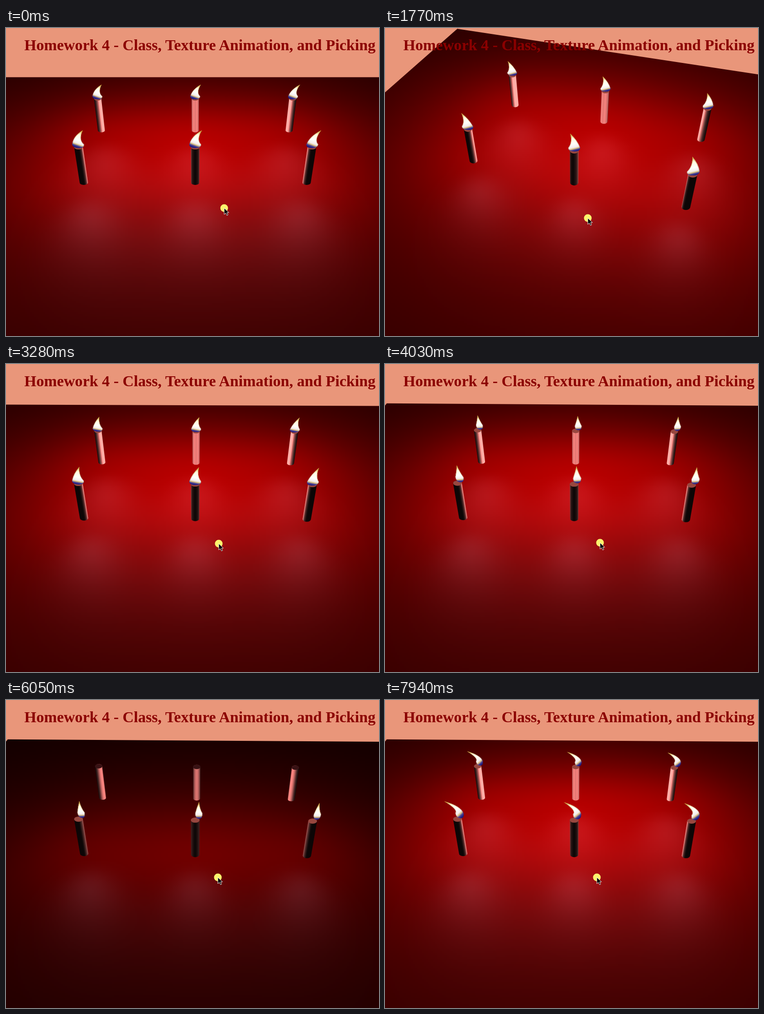
Animation of 824 by 679 pixels, one loop 8000 ms. Source, as an HTML page with a canvas:

```html
<!DOCTYPE html>
<html lang="en">
<head>
<meta charset="utf-8">
<title>Candles</title>
<style>
  html, body { margin: 0; width: 100%; height: 100%; overflow: hidden; background: #e9967a; }
  canvas, svg { position: absolute; left: 0; top: 0; display: block; }
  text { font: bold 34.13px "Liberation Serif", "Times New Roman", serif; fill: #8b0000; }
</style>
</head>
<body>
<canvas id="scene" width="824" height="679"></canvas>
<svg width="824" height="679" viewBox="0 0 824 679">
  <text x="40.5" y="49">Homework 4 - Class, Texture Animation, and Picking</text>
  <g id="pointer">
    <circle r="8.5" fill="#fbf36c"/>
    <path d="M0 0V14L3.4 11L6 16.2L8.4 15L6 10H10.4Z" fill="#000" stroke="#fff" stroke-width="0.9"/>
  </g>
</svg>
<script>
const W = 824, H = 679, LOOP = 8000;
const CX = 418, CY = 341, FOCAL = 1095;   // orbit camera at distance 1
const GAP = 0.2247, HALF = 0.56, TALL = 0.0823, RADIUS = 0.0084, LAMP = 0.1, REACH = 0.04;
const CELL = 4;

const ctx = document.getElementById('scene').getContext('2d');
const pointer = document.getElementById('pointer');
const floor = document.createElement('canvas');
floor.width = W / CELL;
floor.height = Math.ceil(H / CELL);
const floorCtx = floor.getContext('2d');
const pixels = floorCtx.createImageData(floor.width, floor.height);

const candles = [];
for (const z of [-GAP, 0]) for (const x of [-GAP, 0, GAP]) candles.push({ x, z });

// step, yaw, pitch in degrees
const cameraKeys = [[0, 0, 33.75], [7, 13, 40], [13, 18, 42], [20, 11.5, 37.8], [21, 0, 36], [28, 0.9, 36.5]];
// step, x, y
const pointerKeys = [[0, 482, 397], [13, 448, 419], [20, 466, 398], [31, 475, 394], [35, 468, 391]];

function track(keys, at) {
  let i = 0;
  while (i < keys.length - 2 && at > keys[i + 1][0]) i++;
  const a = keys[i], b = keys[i + 1];
  const k = Math.max(0, Math.min(1, (at - a[0]) / (b[0] - a[0])));
  return a.slice(1).map((v, j) => v + (b[j + 1] - v) * k);
}

// The picture advances in steps of about 126 ms, with two longer holds.
function stepAt(t) {
  if (t < 250) return 0;
  if (t < 5920) return 1 + Math.min(43, Math.floor((t - 244) / 126.05));
  return 45 + Math.floor((t - 5916) / 126.25);
}

function isLit(i, step) {
  return i > 2 || step < 35 + 3 * i || step >= 52 + 3 * i;
}

function makeCamera(yawDeg, pitchDeg) {
  const yaw = yawDeg * Math.PI / 180, pitch = pitchDeg * Math.PI / 180;
  const cy = Math.cos(yaw), sy = Math.sin(yaw), c = Math.cos(pitch), s = Math.sin(pitch);
  const turn = p => ({ x: p.x * cy - p.z * sy, z: p.x * sy + p.z * cy });
  const project = (p, y) => {
    const k = FOCAL / (1 - p.z * c - y * s);
    return { x: CX + p.x * k, y: CY - (y * c - p.z * s) * k, k };
  };
  return { c, s, turn, project };
}

function shadeFloor(cam, lamps) {
  const { c, s } = cam, data = pixels.data;
  let o = 0;
  for (let j = 0; j < floor.height; j++) {
    const up = (CY - (j + 0.5) * CELL) / FOCAL;
    const far = s / (s - up * c);
    const z = c - far * (c + up * s);
    for (let i = 0; i < floor.width; i++) {
      const x = ((i + 0.5) * CELL - CX) / FOCAL * far;
      const eye = Math.sqrt(x * x + s * s + (c - z) * (c - z));
      let diffuse = 0, shine = 0;
      for (const p of lamps) {
        const dx = x - p.x, dz = z - p.z, d2 = dx * dx + dz * dz;
        diffuse += 0.06 + 1 / (1 + d2 / REACH);
        const cos = (-x * dx + s * LAMP + (c - z) * dz) / (eye * Math.sqrt(d2 + LAMP * LAMP));
        if (cos > 0) shine += cos ** 13;
      }
      data[o++] = 54 * diffuse + 14 * shine;
      data[o++] = 21 * shine;
      data[o++] = 25 * shine;
      data[o++] = 255;
    }
  }
  floorCtx.putImageData(pixels, 0, 0);
}

function drawTable(cam, lamps) {
  shadeFloor(cam, lamps);
  ctx.save();
  ctx.beginPath();
  for (const [x, z] of [[-1, -1], [1, -1], [1, 1], [-1, 1]]) {
    const q = cam.project(cam.turn({ x: x * HALF, z: z * HALF }), 0);
    ctx.lineTo(q.x, q.y);
  }
  ctx.clip();
  ctx.drawImage(floor, 0, 0, floor.width * CELL, floor.height * CELL);
  ctx.restore();
}

function waxColor(p, side, lamps) {
  const front = Math.sqrt(1 - side * side);
  let sum = 0;
  for (const q of lamps) {
    const dx = q.x - p.x, dz = q.z - p.z, d = Math.hypot(dx, dz);
    if (d > 0.001) sum += Math.max(0, (side * dx + front * dz) / d);
  }
  const k = 0.06 + Math.min(1.55, (sum / 2.4) ** 1.5);
  return `rgb(${[205, 108, 104].map(v => Math.min(255, Math.round(v * k))).join()})`;
}

function drawCandle(cam, p, lamps, lit) {
  const base = cam.project(p, 0), top = cam.project(p, TALL);
  const rb = RADIUS * base.k, rt = RADIUS * top.k;
  const ax = top.x - base.x, ay = top.y - base.y, len = Math.hypot(ax, ay);
  const nx = -ay / len * rt, ny = ax / len * rt;
  const mx = (base.x + top.x) / 2, my = (base.y + top.y) / 2;
  const fill = ctx.createLinearGradient(mx - nx, my - ny, mx + nx, my + ny);
  for (let i = 0; i <= 12; i++) fill.addColorStop(i / 12, waxColor(p, i / 6 - 1, lamps));

  ctx.beginPath();
  ctx.ellipse(base.x, base.y, rb, rb * cam.s, 0, 0, Math.PI);
  ctx.ellipse(top.x, top.y, rt, rt * cam.s, 0, Math.PI, 2 * Math.PI);
  ctx.closePath();
  ctx.fillStyle = fill;
  ctx.fill();

  ctx.beginPath();
  ctx.ellipse(top.x, top.y, rt, rt * cam.s, 0, 0, 2 * Math.PI);
  ctx.fillStyle = lit ? '#98473f' : '#381214';
  ctx.fill();
  return { x: top.x, y: top.y, lean: -ax / ay, k: top.k / 1150 };
}

function ramp(from, to, stops) {
  const g = ctx.createLinearGradient(...from, ...to);
  for (const [at, color] of stops) g.addColorStop(at, color);
  return g;
}

// The tip sways twice per seven steps; the body lifts off the wick once per fourteen.
function flameAt(step) {
  const a = 2 * Math.PI * step / 7;
  const sway = Math.max(-23, 22 * Math.cos(2 * a) - 4 * Math.sin(a) - 7);
  const lift = Math.max(0, Math.cos((a - 8 * Math.PI / 7) / 2)) ** 2;
  return { sway, lift };
}

function drawFlame(at, { sway, lift }) {
  const bend = Math.max(-1, Math.min(1, sway / 15));
  const mid = 8 * lift, half = 13 - 5 * lift, belly = -6 - 9 * lift;
  const tip = [sway, -37 - 3 * lift], base = [1 + 8 * lift, 2 - 5 * lift];
  const edge = side => [mid + side * half, belly];
  const waist = side => [mid + side * half * (0.4 - 0.25 * side * bend), -20 + 4 * side * bend - 6 * lift];
  const left = edge(-1), right = edge(1);

  ctx.save();
  ctx.transform(at.k, 0, -at.lean * at.k, at.k, at.x, at.y);
  ctx.beginPath();
  ctx.moveTo(...base);
  ctx.quadraticCurveTo(left[0], base[1], ...left);
  ctx.quadraticCurveTo(...waist(-1), ...tip);
  ctx.quadraticCurveTo(...waist(1), ...right);
  ctx.quadraticCurveTo(right[0], base[1], ...base);
  ctx.closePath();
  ctx.fillStyle = ramp(base, tip, [
    [0, '#1f1c80'], [0.08, '#4a4292'], [0.15, '#d8c080'], [0.22, '#f4ecec'],
    [0.4, '#fffffa'], [0.7, '#fffbe2'], [1, '#d0a840']
  ]);
  ctx.fill();
  ctx.clip();
  ctx.lineWidth = 2.2;
  ctx.strokeStyle = ramp(base, tip, [[0, '#1d1a78'], [0.1, '#4a3f92'], [0.22, '#d0b8a8'], [0.6, '#e2c890'], [1, '#c4982c']]);
  ctx.stroke();
  ctx.restore();
}

function render(step) {
  const cam = makeCamera(...track(cameraKeys, step));
  const spots = candles.map(cam.turn);
  const lamps = spots.filter((p, i) => isLit(i, step));
  const flame = flameAt(step);

  ctx.fillStyle = '#e9967a';
  ctx.fillRect(0, 0, W, H);
  drawTable(cam, lamps);
  spots.forEach((p, i) => {
    const lit = isLit(i, step);
    const top = drawCandle(cam, p, lamps, lit);
    if (lit) drawFlame(top, flame);
  });
  const [x, y] = track(pointerKeys, step);
  pointer.setAttribute('transform', `translate(${Math.round(x)} ${Math.round(y)})`);
}

const start = performance.now();
let shown = -1;
function tick() {
  const step = stepAt((performance.now() - start) % LOOP);
  if (step !== shown) render(shown = step);
  requestAnimationFrame(tick);
}
tick();
</script>
</body>
</html>
```
